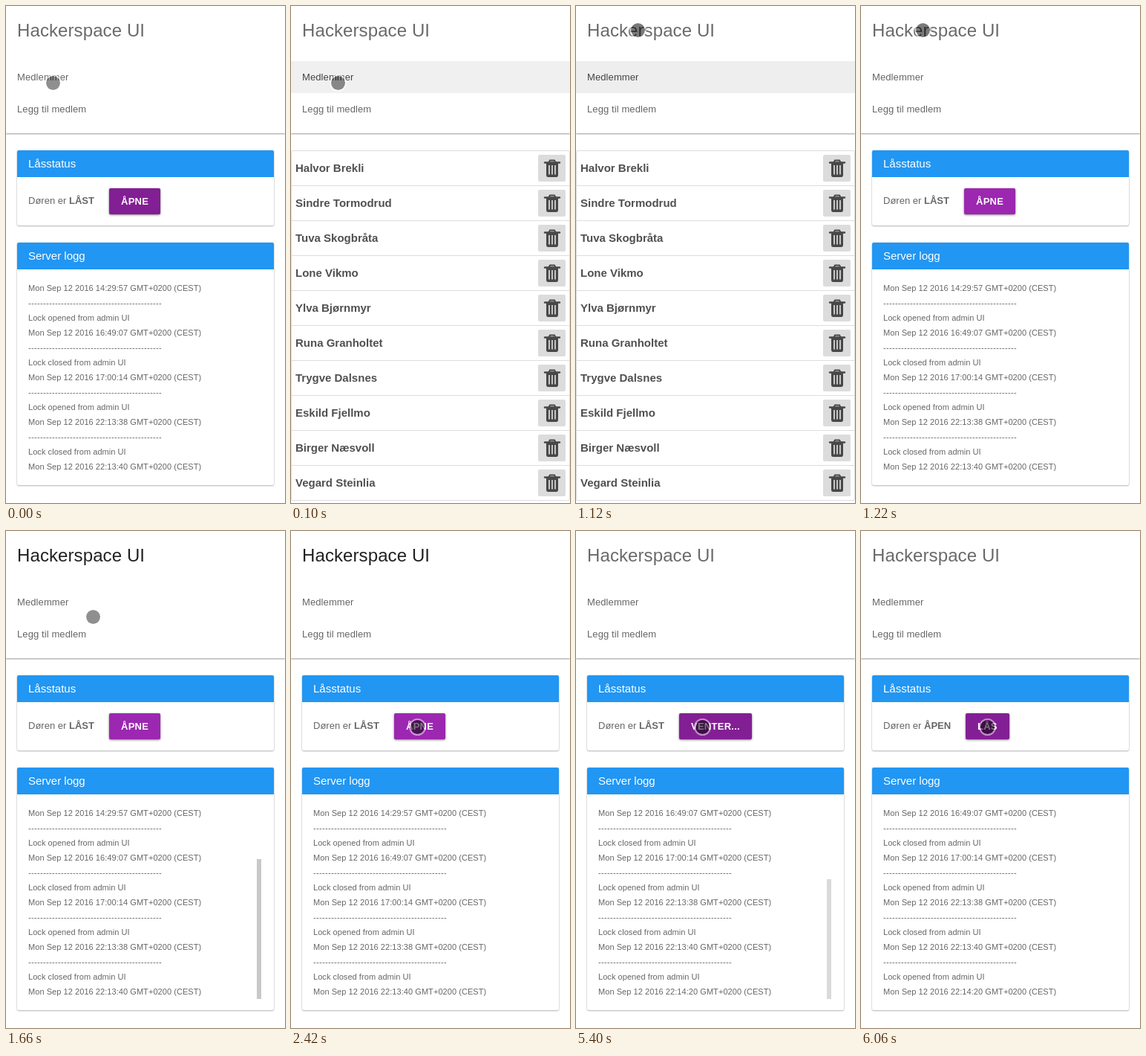
An HTML page that plays this animation: 376x668 px, repeating every 8000 ms.

```html
<!DOCTYPE html>
<html lang="no">
<head>
<meta charset="utf-8">
<style>
  html, body { margin: 0; width: 100%; height: 100%; overflow: hidden; background: #fff; }
  body { position: relative; font: 13px "Liberation Sans", Arial, sans-serif; color: #666; white-space: nowrap; }
  div, b, svg { position: absolute; box-sizing: border-box; }
  #header, #home { left: 0; top: 0; width: 376px; }
  #header { height: 171px; box-shadow: 0 1px 2px rgba(0,0,0,.4); }
  #title { left: 15px; top: 0; font-size: 24px; line-height: 65px; letter-spacing: .1px; }
  .menu { left: 0; width: 376px; height: 43px; padding-left: 15px; line-height: 43px; letter-spacing: .1px; }
  .card { left: 15px; width: 346px; border-radius: 2px; box-shadow: 0 0 2px rgba(0,0,0,.22), 0 1px 2px rgba(0,0,0,.24); }
  .head { left: 0; top: 0; width: 346px; height: 36px; padding-left: 15px; border-radius: 2px 2px 0 0;
    background: #2196f3; color: #fff; font-size: 15px; line-height: 36px; }
  .status { top: 36px; left: 15px; line-height: 63px; }
  #state { left: 70px; top: 0; }
  #button { top: 51px; height: 35px; padding: 0 16px; border-radius: 2px; overflow: hidden; color: #fff;
    font-weight: bold; line-height: 35px; letter-spacing: .02em; box-shadow: 0 0 2px rgba(0,0,0,.15), 0 1px 3px rgba(0,0,0,.45); }
  #label { position: relative; }
  #ripple { border-radius: 50%; background: #000; }
  #log { left: 0; top: 51px; }
  .line { left: 15px; height: 20px; font-size: 11px; line-height: 20px; letter-spacing: .06px; }
  .rule { letter-spacing: .337px; }
  #thumb { left: 323px; width: 6px; background: #c8c8c8; }
  #members { left: 0; top: 194px; width: 376px; height: 471px; border: 1px solid #ddd; border-radius: 2px; }
  .row { left: 0; width: 374px; height: 47px; padding-left: 5px; border-bottom: 1px solid #ddd;
    font-size: 15px; font-weight: bold; line-height: 46px; color: #505050; }
  .row:last-child { border: 0; }
  .row svg { left: 332px; top: 5px; width: 37px; height: 36px; border-radius: 2px; background: #dcdcdc; }
  #cursor { width: 23px; height: 23px; border: 2px solid rgba(255,255,255,.5); border-radius: 50%; background-clip: padding-box; }
</style>
</head>
<body>
<div id="header">
  <div id="title">Hackerspace UI</div>
  <div class="menu" id="membersLink" style="top:74px">Medlemmer</div>
  <div class="menu" style="top:117px">Legg til medlem</div>
</div>
<div id="home">
  <div class="card" style="top:194px;height:101px">
    <div class="head">Låsstatus</div>
    <div class="status">Døren er</div>
    <div class="status" style="left:0"><b id="state"></b></div>
    <div id="button"><div id="ripple"></div><span id="label"></span></div>
  </div>
  <div class="card" style="top:318px;height:326px">
    <div class="head">Server logg</div>
    <div id="log"></div>
    <div id="thumb"></div>
  </div>
</div>
<div id="members"></div>
<div id="cursor"></div>
<script>
const LOOP = 8000, STEP = 108.2;
const $ = id => document.getElementById(id);
const clamp = x => Math.min(1, Math.max(0, x));
const ramp = (t, from, to) => clamp((t - from) / (to - from));
const mix = (a, b, p) => a + (b - a) * p;
const mixColor = (a, b, p) => `rgb(${a.map((v, i) => Math.round(mix(v, b[i], p)))})`;

const people = ['Halvor Brekli', 'Sindre Tormodrud', 'Tuva Skogbråta', 'Lone Vikmo', 'Ylva Bjørnmyr',
  'Runa Granholtet', 'Trygve Dalsnes', 'Eskild Fjellmo', 'Birger Næsvoll', 'Vegard Steinlia'];
const trash = `<svg viewBox="0 0 37 36"><g fill="none" stroke="#484848" stroke-width="2">
  <path d="M9 10.5H29" stroke-width="2.4" stroke-linecap="round"/><path d="M14.5 10L16 7.5H22L23.5 10"/></g>
  <path d="M11 11H27V27Q27 30 24.5 30H13.5Q11 30 11 27Z" fill="#484848"/>
  <path d="M15 14V26.5M19 14V26.5M23 14V26.5" stroke="#dcdcdc" stroke-width="1.7"/></svg>`;
$('members').innerHTML = people.map((name, i) =>
  `<div class="row" style="top:${i * 47}px">${name}${trash}</div>`).join('');

const times = ['14:29:57', '16:49:07', '17:00:14', '22:13:38', '22:13:40', '22:14:20'];
const lines = times.flatMap((time, i) => [
  `Mon Sep 12 2016 ${time} GMT+0200 (CEST)`,
  '-'.repeat(45),
  `Lock ${i % 2 ? 'closed' : 'opened'} from admin UI`
]);
const logHtml = first => lines.slice(first, first + 13).map((text, i) =>
  `<div class="line${text[0] === '-' ? ' rule' : ''}" style="top:${i * 20}px">${text}</div>`).join('');
const logs = [logHtml(0), logHtml(3)];
let shownLog = -1;

// time, x, y
const path = [
  [450, 63.5, 103.5], [560, 65, 96], [670, 69, 72], [780, 74, 42], [885, 80, 16], [1000, 83, 20], [1100, 83.5, 32.5],
  [1320, 83.5, 32.5], [1420, 88, 43], [1540, 101, 78], [1645, 117.5, 116.5], [1880, 150, 170],
  [1980, 161, 197], [2100, 168, 231], [2190, 170.5, 255], [2290, 170.5, 263.5]
];
function cursorAt(t) {
  const next = path.findIndex(point => point[0] > t);
  if (next === 0) return path[0].slice(1);
  if (next < 0) return path[path.length - 1].slice(1);
  const [a, b] = [path[next - 1], path[next]];
  const p = ramp(t, a[0], b[0]);
  return [mix(a[1], b[1], p), mix(a[2], b[2], p)];
}

function snap(t) {
  const start = t < 560 ? 0 : t < 4760 ? 560 : 4760;
  return start ? start + Math.floor((t - start) / STEP + 1e-6) * STEP : t;
}

function draw(time) {
  const t = snap(time);
  const onMembers = time >= 100 && time < 1220;
  $('home').style.display = onMembers ? 'none' : '';
  $('members').style.display = onMembers ? '' : 'none';
  $('membersLink').style.background = onMembers ? (time < 560 ? '#f0f0f0' : '#eee') : '';
  $('membersLink').style.color = onMembers ? '#444' : '';

  const titleFocus = ramp(t, 1320, 1530) - ramp(t, 4760, 4960);
  $('title').style.color = mixColor([106, 106, 106], [33, 33, 33], titleFocus);

  const waiting = time >= 4760 && time < 5620, open = time >= 5620;
  const buttonFocus = time < 100 ? 1 : ramp(t, 4760, 4960);
  $('state').textContent = open ? 'ÅPEN' : 'LÅST';
  $('label').textContent = open ? 'LÅS' : waiting ? 'VENTER...' : 'ÅPNE';
  $('button').style.left = open ? '126px' : '124px';
  $('button').style.background = mixColor([156, 39, 176], [131, 31, 148], buttonFocus);

  const spread = ramp(t, 4760, 5200), radius = mix(13, 60, 1 - (1 - spread) ** 2);
  Object.assign($('ripple').style, {
    left: 49 - radius + 'px', top: 17 - radius + 'px', width: 2 * radius + 'px', height: 2 * radius + 'px',
    opacity: waiting ? .3 * (1 - spread) : 0
  });

  const updated = time >= 4860 ? 1 : 0;
  if (updated !== shownLog) $('log').innerHTML = logs[shownLog = updated];
  const thumbHeight = updated ? 161 : 188;
  $('thumb').style.top = 311 - thumbHeight + 'px';
  $('thumb').style.height = thumbHeight + 'px';
  $('thumb').style.opacity = time < 1420 ? 0 : updated ? 1 - ramp(t, 5200, 5500) : 1 - ramp(t, 1780, 2180);

  const [x, y] = cursorAt(t);
  const pressed = time >= 2420 || (time >= 1120 && time < 1420);
  $('cursor').style.left = x - 11.5 + 'px';
  $('cursor').style.top = y - 11.5 + 'px';
  $('cursor').style.backgroundColor = `rgba(0,0,0,${pressed ? .52 : .44})`;
}

const begin = performance.now();
function frame() {
  draw((performance.now() - begin) % LOOP);
  requestAnimationFrame(frame);
}
frame();
</script>
</body>
</html>
```
